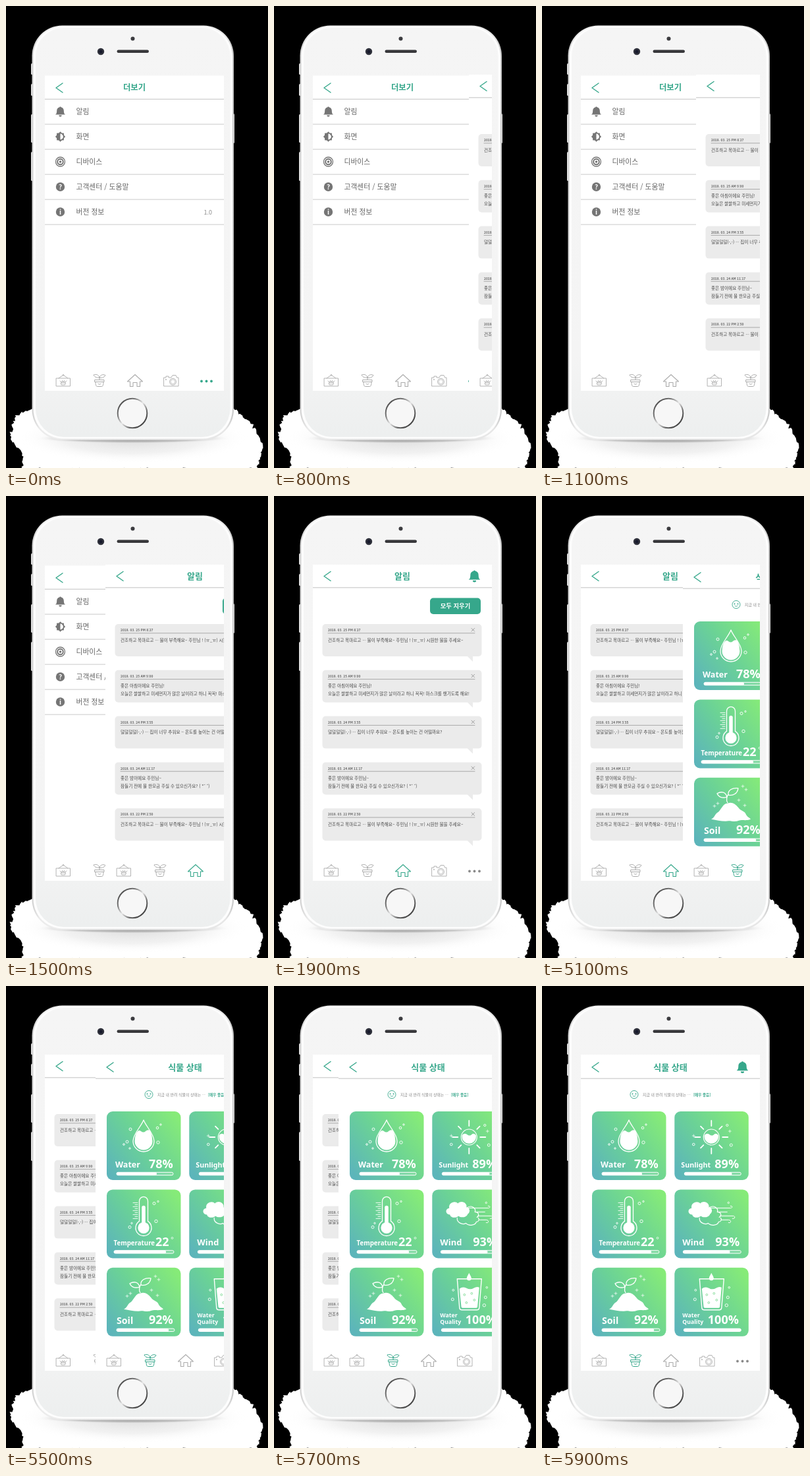
These frames come from a looping animation (398 px wide and 700 px high, 8 s). An HTML page:

```html
<!DOCTYPE html>
<html lang="ko">
<head>
<meta charset="utf-8">
<title>Plant care app</title>
<style>
html, body { margin: 0; width: 100%; height: 100%; overflow: hidden; background: #000; }
svg { display: block; width: 398px; height: 700px; }
text { font-family: "Noto Sans CJK KR", "Noto Sans CJK JP", "Noto Sans", sans-serif; white-space: pre; }
.card text { font-family: "Noto Sans", "Open Sans", sans-serif; }
.line { fill: none; stroke-linecap: round; stroke-linejoin: round; }
</style>
</head>
<body>
<svg id="stage" viewBox="0 0 398 700" xmlns="http://www.w3.org/2000/svg"></svg>
<script>
const GREEN = '#36a78b', GREY = '#acacac', DARK = '#666';

const text = (x, y, size, str, fill = DARK, weight = 400, anchor = 'start') =>
  `<text x="${x}" y="${y}" font-size="${size}" fill="${fill}" font-weight="${weight}" text-anchor="${anchor}">${str}</text>`;
const line = (d, stroke, width = 1) => `<path class="line" d="${d}" stroke="${stroke}" stroke-width="${width}"/>`;
const shape = (d, fill = '#fff') => `<path d="${d}" fill="${fill}"/>`;
const rect = (x, y, w, h, fill, r = 0) => `<rect x="${x}" y="${y}" width="${w}" height="${h}" rx="${r}" fill="${fill}"/>`;
const dot = (x, y, r, fill = '#fff') => `<circle cx="${x}" cy="${y}" r="${r}" fill="${fill}"/>`;
const ring = (x, y, r, stroke = '#fff', width = 1) =>
  `<circle cx="${x}" cy="${y}" r="${r}" fill="none" stroke="${stroke}" stroke-width="${width}"/>`;
const at = (x, y, body, scale = 1) => `<g transform="translate(${x} ${y}) scale(${scale})">${body}</g>`;
const rings = points => points.map(([x, y, r]) => ring(x, y, r, '#fff', .9)).join('');
const sparks = points => points.map(([x, y]) => line(`M${x - 2} ${y}h4M${x} ${y - 2}v4`, '#fff', .7)).join('');

const bell = fill => shape('M-8.7 5.2Q-6.2 3.5-6.2 0V-1.5C-6.2-5-4.2-7.2-1.6-7.7A1.7 1.7 0 0 1 1.6-7.7C4.2-7.2 6.2-5 6.2-1.5V0Q6.2 3.5 8.7 5.2ZM-2.6 6.4H2.6A2.6 2.6 0 0 1-2.6 6.4Z', fill);

const tabIcons = [
  [87, c => line('M-10.5-4H10.5V8H-10.5ZM-7-4L-.8-8.3M7-4L.8-8.3', c, .9) + ring(0, -8.7, 1, c, .8)
    + line('M-5 0L-2.5 2.5L-1.5-.5L0 2L1.5-.5L2.5 2.5L5 0M-3.5 3H3.5L2.5 6H-2.5Z', c, .9)],
  [142, c => line('M-7-1.5H7V1.5H-7ZM-6 1.5Q-6 8.5-3.5 8.5H3.5Q6 8.5 6 1.5M0-1.5V-5', c)
    + line('M0-5C-3-4.5-7-5-9-9C-5.5-10.5-1-9.5 0-5C2-4 7-4.5 9-8.5C5-10.5 1-9 0-5ZM-2.3 4Q0 6.8 2.3 4', c)],
  [196, c => line('M-11.5 1L0-9.5L11.5 1H7.5V8.5H3V2.5H-3V8.5H-7.5V1Z', c, 1.1)],
  [251, c => line('M-11-5H-8V-7H-4V-5H0L2-8.5H7L8.5-5H11V8H-11Z', c, .9)
    + ring(2.5, 1.3, 5, c, .9) + ring(2.5, 1.3, 3.4, c, .7) + dot(-8, -2, .9, c)],
  [304.5, c => [-7.5, 0, 7.5].map(x => dot(x, .5, 1.9, c)).join('')]
];
const tabs = active => tabIcons.map(([x, icon], i) =>
  at(x, 568, icon(i === active ? GREEN : i === 4 ? '#8a8a8a' : GREY))).join('');

const screen = (title, size, y, tab, body) =>
  rect(59, 104, 272, 479, '#fff')
  + line(`M86 ${y - 7}L76 ${y}L86 ${y + 7}`, GREEN, 1.4)
  + text(195, y + size * .36, size, title, GREEN, 700, 'middle')
  + rect(59, y + 16.5, 272, 1.5, '#d6d6d6')
  + body + tabs(tab);

function menuScreen() {
  const square = 'M-5.4-5.4H5.4V5.4H-5.4Z';
  const icons = [
    at(0, 0, bell('#757575'), .86),
    shape(square, '#757575') + `<g transform="rotate(45)">${shape(square, '#757575')}</g>`
      + shape('M0-4.4A4.4 4.4 0 0 1 0 4.4Z'),
    ring(0, 0, 7, '#757575', 1.3) + ring(0, 0, 4.3, '#757575', 2) + dot(0, 0, 1.8, '#757575'),
    dot(0, 0, 6.7, '#757575') + text(0, 3.6, 10, '?', '#fff', 700, 'middle'),
    dot(0, 0, 6.7, '#757575') + text(0, 3.6, 10, 'i', '#fff', 700, 'middle')
  ];
  const rows = ['알림', '화면', '디바이스', '고객센터 / 도움말', '버전 정보'].map((label, i) => {
    const y = 160 + 38 * i;
    return at(82.5, y, icons[i]) + text(106.5, y + 4.3, 10.8, label) + rect(59, y + 18.5, 272, 1.3, '#d6d6d6');
  });
  return screen('더보기', 12.4, 124, 4, rows.join('') + text(313, 315.5, 9, '1.0', '#888', 400, 'end'));
}

function alertScreen() {
  const thirsty = ['건조하고 목마르고 ··· 물이 부족해요~ 주민님 ! (ㅠ_ㅠ) 시원한 물을 주세요~'];
  const alerts = [
    ['25 PM 8:27', thirsty],
    ['25 AM 9:00', ['좋은 아침이에요 주민님!', '오늘은 쌀쌀하고 미세먼지가 많은 날이라고 하니 꼭꼭! 마스크를 챙기도록 해요!']],
    ['24 PM 3:55', ['덜덜덜덜(-,-) ··· 집이 너무 추워요 ~ 온도를 높이는 건 어떨까요?']],
    ['24 AM 11:17', ['좋은 밤이에요 주민님~', '잠들기 전에 물 한모금 주실 수 있으신가요? ( *˘ ˘)']],
    ['22 PM 2:50', thirsty]
  ];
  const bubbles = alerts.map(([date, lines], i) => at(0, 194 + 69.8 * i,
    rect(73.5, 0, 242, 49, '#ebebeb', 5) + shape('M293.5 48.5H302V57Z', '#ebebeb')
    + text(82, 11.3, 4.9, '2018. 03. ' + date, '#666', 700)
    + line('M82 13.8H305', '#999', .8) + line('M300 6.5l4.6 4.6m0-4.6l-4.6 4.6', '#888', .8)
    + lines.map((s, j) => text(82, 26.6 + 11.6 * j, 6.6, s, '#484848', 500)).join('')));
  return screen('알림', 13, 121.5, 2, at(304.5, 121.5, bell(GREEN))
    + rect(237, 154.5, 77, 24.5, GREEN, 5) + text(275.5, 170, 9.3, '모두 지우기', '#fff', 700, 'middle')
    + bubbles.join(''));
}

function statusScreen() {
  const rays = Array.from({ length: 8 }, (_, i) => {
    const a = i * Math.PI / 4, end = i % 2 ? 23 : 25;
    return `M${56 + 17 * Math.cos(a)} ${39 + 17 * Math.sin(a)}L${56 + end * Math.cos(a)} ${39 + end * Math.sin(a)}`;
  }).join('');
  const ticks = Array.from({ length: 9 }, (_, i) => `M${i % 2 ? 43 : 40} ${20 + i * 3}H47`).join('');
  const art = {
    water: line('M56 13C53 22 40 34 40 45A16 16 0 0 0 72 45C72 34 59 22 56 13Z', '#fff', 1.3)
      + shape('M44.5 34Q48 27 52 30T59 30T66 29Q69 36 69.5 45A13.5 13.5 0 0 1 42.5 45Q42.5 39 44.5 34Z')
      + rings([[36, 27, 2], [31, 46, 2], [26, 50, 1.3], [78, 47, 2.2], [77, 25, 1.8], [35, 56, 1.2], [82, 20, 1.2]]),
    sun: ring(56, 39, 12, '#fff', 1.1) + shape('M45.5 36Q49 32 53 35T60 35T66.5 36A10.7 10.7 0 1 1 45.5 36Z')
      + line(rays, '#fff', 1.8)
      + rings([[29, 50, 1.8], [86, 51, 2], [80, 21, 1.6]]) + sparks([[29, 37], [84, 30]]),
    thermometer: line('M49.5 48V17.5A6.5 6.5 0 0 1 62.5 17.5V48A12 12 0 1 1 49.5 48Z', '#fff', 1.3)
      + dot(56, 58, 8.6) + line('M56 58V27', '#fff', 5.5) + line(ticks, '#fff', .9)
      + rings([[72, 21, 2], [75, 48, 2.2], [35, 57, 2], [38, 51, 1.2], [78, 18, 1.2]]),
    wind: shape('M27 38C20 38 19 29 26 28C24 20 35 16 39 21C45 15 54 21 52 27C58 27 58 35 54 37C52 43 43 43 40 40C36 44 28 43 27 38Z')
      + line('M38 43C37 50 46 54 51 51C56 56 66 54 67 49C71 49 72 45 70 43M52 28C60 22 67 29 65 34C71 34 72 40 68 42', '#fff', 1.2)
      + line('M52 28H85C89 28 88 24 85 25M66 34H80M69 40H89C93 40 92 45 88 44M71 46H82C87 46 86 52 82 50', '#fff', 1)
      + rings([[82, 20, 1.2]]),
    soil: shape('M26 63C31 61 32 54 37 52C42 47 44 39 51 39C57 36 63 40 67 45C71 51 77 50 79 56C81 60 84 60 86 63C78 66 73 63 68 65C61 68 55 64 48 66C40 66 34 64 26 63Z')
      + line('M51 38C48 34 50 28 52 25M50 29C43 32 37 29 35 24C42 20 48 22 50 29ZM52 26C51 19 58 15 67 16C66 24 59 28 52 26Z', '#fff', 1.3)
      + sparks([[31, 43], [36, 39], [74, 13], [79, 18], [68, 34], [77, 42]]),
    glass: line('M38 17H75L71.5 61Q71 64 68 64H45Q42 64 41.5 61Z', '#fff', 1.4)
      + shape('M41.5 32Q46 28 52 31T63 31T71.5 30L68.8 59Q68.6 61 67 61H46Q44.4 61 44.2 59Z')
      + shape('M56 8C54 12 52.5 14 52.5 16A3.5 3.5 0 0 0 59.5 16C59.5 14 58 12 56 8Z')
      + [[49, 41], [60, 39], [64, 49], [52, 53]].map(([x, y]) => ring(x, y, 1.4, '#72d78a', .8)).join('')
      + rings([[31, 48, 2], [32, 34, 1.4], [81, 45, 2], [79, 57, 2.2], [83, 30, 1.3]])
  };
  // column, row, art, label lines, label x, label size, value, value x, bar x, bar width, bar fill
  const cards = [
    [0, 0, 'water', ['Water'], 13, 12.5, '78%', 64, 15, 86, .71],
    [1, 0, 'sun', ['Sunlight'], 10, 10.7, '89%', 61, 15, 86, .84],
    [0, 1, 'thermometer', ['Temperature'], 10.5, 9.7, '22', 74, 11, 91, .87],
    [1, 1, 'wind', ['Wind'], 12, 12.9, '93%', 62, 13, 88, .81],
    [0, 2, 'soil', ['Soil'], 15, 14.2, '92%', 64, 15, 88, .9],
    [1, 2, 'glass', ['Water', 'Quality'], 12, 8.7, '100%', 50.5, 14, 87, 1]
  ];
  const drawn = cards.map(([col, row, icon, label, lx, size, value, vx, bx, bw, fill]) =>
    at(76 + 125.3 * col, 190 + 118.4 * row,
      rect(0, 0, 112.5, 104, 'url(#card)', 9) + art[icon]
      + label.map((s, i) => text(lx, (label[1] ? 75.5 : 85) + i * 9.8, size, s, '#fff', 600)).join('')
      + text(vx, 85.5, 18, value, '#fff', 700)
      + (icon === 'thermometer' ? ring(99.5, 73.5, 1.4, '#fff', .8) : '')
      + `<rect x="${bx}" y="92.3" width="${bw}" height="4.4" rx="2.2" fill="#fff" fill-opacity=".15" stroke="#fff" stroke-width="1"/>`
      + rect(bx, 92.3, bw * fill, 4.4, '#fff', 2.2)));
  return screen('식물 상태', 13, 123, 1, at(304.5, 123, bell(GREEN))
    + ring(140, 164.5, 6, GREEN, .9) + dot(137.5, 163.5, 1, GREEN) + dot(142.5, 163.5, 1, GREEN)
    + line('M138 166.5Q140 168.5 142 166.5', GREEN, .8)
    + text(153, 166.8, 5.9, '지금 내 반려 식물의 상태는 ···', '#888')
    + text(230, 166.8, 5.6, '[매우 좋음]', GREEN, 700) + `<g class="card">${drawn.join('')}</g>`);
}

function floorGlow() {
  let seed = 7;
  const jitter = () => ((seed = seed * 16807 % 2147483647) / 2147483647 - .5) * 5;
  const corners = [[44, 608], [13, 621], [6, 655], [24, 678], [26, 702], [382, 702], [384, 686], [391, 672], [376, 638], [343, 606]];
  const points = corners.slice(1).flatMap(([x1, y1], i) => {
    const [x0, y0] = corners[i];
    const count = Math.ceil(Math.hypot(x1 - x0, y1 - y0) / 3);
    return Array.from({ length: count }, (_, j) =>
      [x0 + (x1 - x0) * j / count + jitter(), y0 + (y1 - y0) * j / count + jitter()]);
  });
  return `<polygon points="${points.join(' ')}" fill="#fff"/>`
    + '<ellipse cx="193" cy="655" rx="176" ry="38" fill="url(#haze)"/>'
    + '<ellipse cx="193" cy="655" rx="150" ry="8" fill="url(#shadow)"/>';
}

function phone() {
  const button = (x, y, h) => rect(x, y, 4, h, '#e6e6e6', 1.5);
  return button(38, 87, 17) + button(38, 118, 18) + button(38, 164, 43) + button(38, 221, 44) + button(343, 163, 45)
    + rect(39.5, 29.5, 306.5, 628, 'url(#metal)', 46)
    + rect(41.5, 31, 302.5, 624.5, '#fdfdfd', 45)
    + rect(45, 33, 295.5, 620, 'url(#front)', 43)
    + dot(192.5, 49.5, 3, '#3c3c40') + dot(144, 69, 5.2, '#30323c') + dot(144, 69, 2.6, '#171a2c')
    + rect(168.5, 66.5, 48.5, 4.6, '#38383b', 2.3)
    + dot(192, 617, 23.5, '#f7f7f7') + ring(192, 617, 22.3, 'url(#home)', 2);
}

const stops = list => list.map(([o, c, a = 1]) => `<stop offset="${o}" stop-color="${c}" stop-opacity="${a}"/>`).join('');
const stage = document.getElementById('stage');
stage.innerHTML = `<defs>
  <linearGradient id="card" x1="0" y1=".85" x2="1" y2=".15">${stops([[0, '#5cb5ba'], [.5, '#6bd296'], [1, '#86eb78']])}</linearGradient>
  <linearGradient id="metal">${stops([[0, '#cfcfcf'], [.04, '#ececec'], [.96, '#e6e6e6'], [1, '#c6c6c6']])}</linearGradient>
  <linearGradient id="front" x1="0" y1="0" x2="0" y2="1">${stops([[0, '#f5f5f5'], [.8, '#f4f4f4'], [1, '#edefef']])}</linearGradient>
  <linearGradient id="home" x1="0" y1="0" x2="1" y2="1">${stops([[0, '#333'], [.3, '#777'], [.5, '#e8e8e8'], [.7, '#666'], [1, '#222']])}</linearGradient>
  <radialGradient id="haze">${stops([[0, '#ccc', .7], [.6, '#e4e4e4', .5], [1, '#fff', 0]])}</radialGradient>
  <radialGradient id="shadow">${stops([[0, '#777', .8], [.7, '#999', .5], [1, '#fff', 0]])}</radialGradient>
  <clipPath id="display"><rect x="59" y="104" width="272" height="479"/></clipPath>
</defs>${floorGlow()}${phone()}
<g clip-path="url(#display)">
  <g>${menuScreen()}${rect(59, 104, 272, 1.5, '#f5f5f5')}</g>
  <g id="alerts">${alertScreen()}</g>
  <g id="status">${statusScreen()}</g>
</g>`;

// Each slide holds [step, x offset] stops; one step lasts 100 ms.
const slides = [
  { el: document.getElementById('alerts'), start: 600, stops: [[1, 258], [5, 175], [9, 92], [13, 0]] },
  { el: document.getElementById('status'), start: 4600, stops: [[1, 242], [5, 155], [9, 77], [13, 0]] }
];

function offsetAt(stops, step) {
  if (step < 1) return 280;
  const next = stops.findIndex(([s]) => s > step);
  if (next < 0) return 0;
  const [s0, x0] = stops[next - 1], [s1, x1] = stops[next];
  return Math.round(x0 + (x1 - x0) * (step - s0) / (s1 - s0));
}

const begin = performance.now();
function draw() {
  const time = (performance.now() - begin) % 8000;
  for (const { el, start, stops } of slides) {
    const step = Math.floor((time - start) / 100);
    el.setAttribute('transform', `translate(${offsetAt(stops, step)} 0)`);
  }
  requestAnimationFrame(draw);
}
draw();
</script>
</body>
</html>
```
